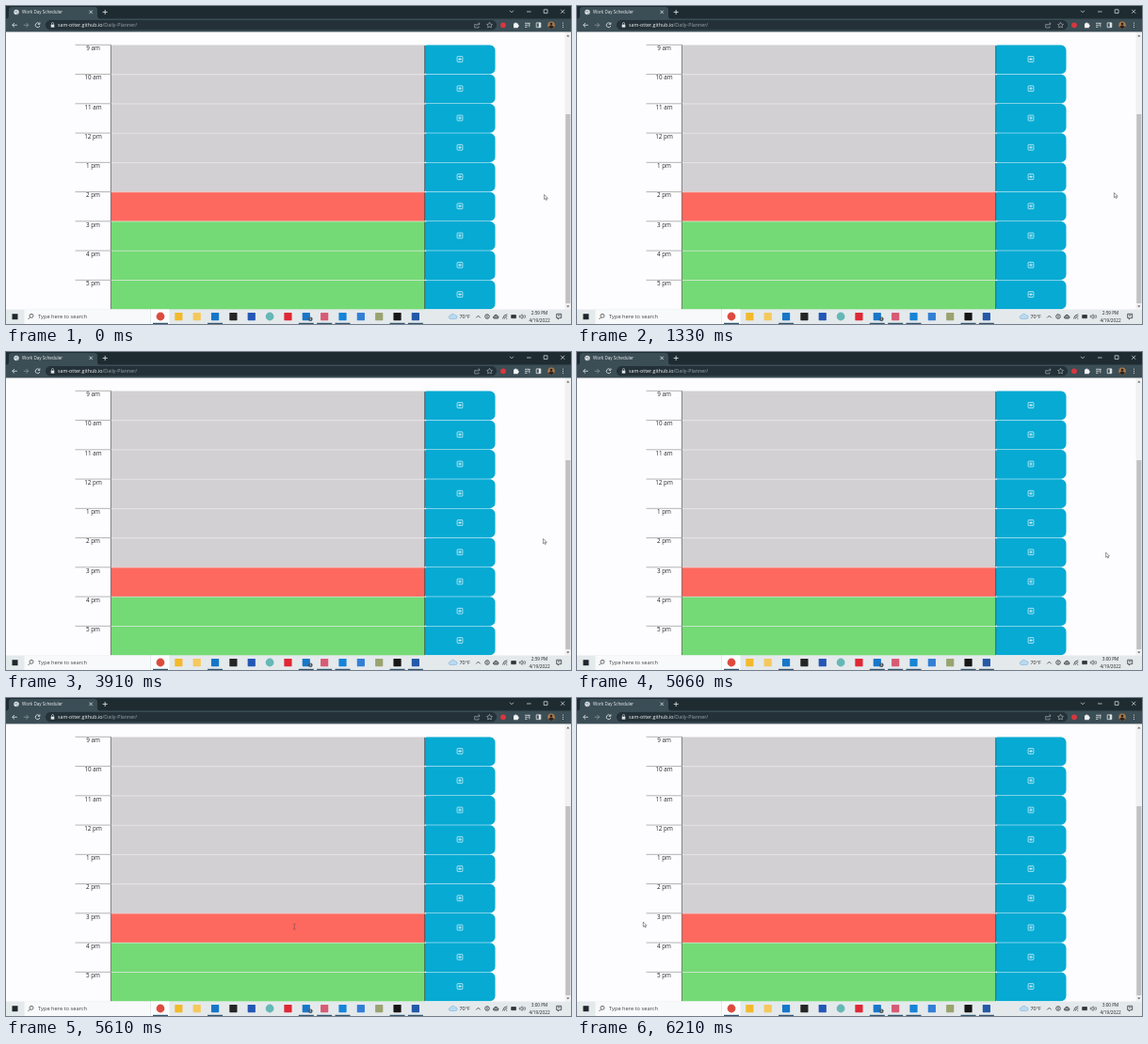
Recreate the animation shown at these times as an HTML page. Size 600 px wide and 338 px high, loop 6240 ms.

```html
<!DOCTYPE html>
<html lang="en">
<head>
<meta charset="utf-8">
<title>Work Day Scheduler</title>
<style>
html, body { margin: 0; width: 100%; height: 100%; overflow: hidden; background: #fdfcfe; }
svg { display: block; width: 100vw; height: 100vh; }
text { font-family: "Open Sans", "Noto Sans", sans-serif; }
</style>
</head>
<body>
<svg id="stage" viewBox="0 0 600 338" xmlns="http://www.w3.org/2000/svg">
  <rect width="600" height="338" fill="#fdfcfe"/>

  <g id="planner"></g>

  <g id="scrollbar">
    <rect x="593.5" y="27.500" width="6.500" height="295" fill="#f1f1f1"/>
    <rect x="594.300" y="115" width="5" height="201" fill="#c1c1c1"/>
    <path d="M595.200 32.400l1.600-1.800 1.600 1.800z" fill="#666"/>
    <path d="M595.200 318.400l1.600 1.800 1.600-1.800z" fill="#555"/>
  </g>

  <g id="browser" fill="none" stroke="#e4eaec" stroke-width=".8">
    <rect width="600" height="14" fill="#1e2c32" stroke="none"/>
    <path d="M0 13.500Q3 13.500 3 10.500V4Q3 1 6 1H94Q97 1 97 4V10.500Q97 13.500 100 13.500H600V27.500H0Z" fill="#3b4d55" stroke="none"/>
    <rect x="42" y="15" width="479" height="10.500" rx="5.250" fill="#243138" stroke="none"/>
    <circle cx="11" cy="6.500" r="2.700" fill="#dfe5e8" stroke="none"/>
    <path d="M9 5.500l2 1 1-2M11 9l1.500-2" stroke="#56676f" stroke-width=".6"/>
    <path d="M88.500 4.700l3.400 3.400m0-3.400l-3.400 3.400M102.700 6.500h5m-2.500-2.500v5"/>
    <path d="M535 4.800l2 2 2-2M553 6h4.500M571.200 3.800h3.800v3.800h-3.800zM589.200 3.800l4 4m0-4l-4 4" stroke-width=".7"/>
    <path d="M11.800 20.300H6.800M9 18L6.700 20.300 9 22.600"/>
    <path d="M18.800 20.300H23.800M21.500 18L23.800 20.300 21.500 22.600" stroke="#8d9ba2"/>
    <path d="M35.300 18.600A2.400 2.400 0 1 0 35.900 21M35.900 17.400V19.400H33.800"/>
    <rect x="47.700" y="19.700" width="3.600" height="3" fill="#dce2e5" stroke="none"/>
    <path d="M48.500 19.700V18.500a1 1 0 0 1 2 0V19.700" stroke-width=".6"/>
    <g stroke="#b4bec3" stroke-width=".6">
      <path d="M499.500 19.500H497.700V23H502V21.500M499.500 21Q500 18.800 503 18.800M501.700 17.400L503.200 18.800 501.700 20.300"/>
      <path d="M513.500 17.300l.9 1.900 2.100.3-1.500 1.400.4 2.100-1.900-1-1.900 1 .4-2.100-1.500-1.400 2.100-.3z"/>
    </g>
    <circle cx="528" cy="20.300" r="2.900" fill="#d9363e" stroke="none"/>
    <path d="M539 18.500h1.300a1 1 0 0 1 2 0h1.500v1.600a1 1 0 0 1 0 2v1.100H539z" fill="#f2f4f5" stroke="none"/>
    <path d="M551 18.300h5.500M551 20.300h3.500M551 22.300h2.500M555.800 18.300v4"/>
    <path d="M563.200 17.900h4.600v4.800h-4.600z"/>
    <path d="M565.700 17.900h2.100v4.800h-2.100z" fill="#e4eaec" stroke="none"/>
    <circle cx="579" cy="20.300" r="3.800" fill="#a5794d" stroke="none"/>
    <path d="M576 22.600Q579 18.600 582 22.600Q579 25.300 576 22.600" fill="#2c211c" stroke="none"/>
    <circle cx="579" cy="19" r="1.300" fill="#2c211c" stroke="none"/>
    <path d="M591.500 17.700v.9m0 1.300v.9m0 1.300v.9" stroke-width="1"/>
    <g stroke="none">
      <text x="17" y="8.300" font-size="4.600" fill="#edf1f2">Work Day Scheduler</text>
      <text x="55" y="22.100" font-size="5.300" fill="#f3f5f6">sam-otter.github.io<tspan fill="#9aa6ac">/Daily-Planner/</tspan></text>
    </g>
  </g>

  <g id="taskbar">
    <rect y="322.500" width="600" height="15.500" fill="#e4e9ec"/>
    <rect x="6.500" y="327.200" width="6" height="6" fill="#20272b"/>
    <rect x="19.500" y="322.500" width="133.500" height="15.500" fill="#f8f9fa"/>
    <g fill="none" stroke="#333" stroke-width=".7">
      <circle cx="27" cy="329.300" r="2"/>
      <path d="M25.500 330.900l-2 2.100"/>
    </g>
    <text x="34" y="332" font-size="5.700" fill="#454545">Type here to search</text>
    <rect x="154" y="322.500" width="19.500" height="15.500" fill="#fbfdfe"/>
    <g id="apps"></g>
    <circle cx="323.300" cy="332.800" r="2.300" fill="#40515d"/>
    <text x="323.300" y="334.200" font-size="3.600" fill="#fff" text-anchor="middle">3</text>
    <path d="M472 332.500a1.700 1.700 0 0 1 0-3.400a2.700 2.700 0 0 1 5-.4a1.900 1.900 0 0 1 .5 3.800z" fill="#b9daf0" stroke="#6fa9d4" stroke-width=".5"/>
    <text x="481.500" y="332.200" font-size="5.400" fill="#222">70°F</text>
    <g fill="none" stroke="#30363a" stroke-width=".8">
      <path d="M499.300 331.400l2.200-2.200 2.200 2.200"/>
      <circle cx="511" cy="330" r="2.300"/><path d="M511 328.500v3"/>
      <path d="M518.200 332a1.200 1.200 0 0 1 .1-2.300a2 2 0 0 1 3.800-.1a1.300 1.300 0 0 1 .2 2.400z" fill="#8a9195"/>
      <path d="M527.500 332.500Q528 328.200 532.300 327.800M529.300 332.500Q529.600 330 532.300 329.800M531.200 332.300h1"/>
      <path d="M536.700 328.500h4.700v3.200h-4.700z" fill="#30363a"/>
      <path d="M545.300 329.200h1.300l1.600-1.400v4.600l-1.600-1.400h-1.300zM549.300 328.800q1.200 1.400 0 2.700M550.700 328q1.700 2.100 0 4.200" stroke-width=".6"/>
      <path d="M584.700 327.300h5v4.300h-2.200l-1.200 1.500v-1.500h-1.600zM586 329h2.500"/>
    </g>
    <g font-size="4.700" fill="#222" text-anchor="middle">
      <text id="clock" x="566.500" y="328.200"></text>
      <text x="566.500" y="335.500">4/19/2022</text>
    </g>
  </g>

  <g id="cursor">
    <path id="arrow" d="M0 0V5.200L1.300 4.100 2.100 6 2.900 5.600 2.200 3.800H3.800Z" fill="#fff" stroke="#444" stroke-width=".55"/>
    <path id="beam" d="M-1.300-2.800H-.3L0-2.500.3-2.800H1.300M0-2.500V2.500M-1.300 2.800H-.3L0 2.500.3 2.800H1.300" fill="none" stroke="#67504d" stroke-width=".6"/>
    <path id="hand" d="M-.6 0Q0-.7.6 0V2.300L3 3V5L2.300 6.800H-.6L-2 4.200-1.300 3.600-.6 4.200Z" fill="#fff" stroke="#222" stroke-width=".5"/>
  </g>
</svg>
<script>
const LOOP = 6240;
// switched a little early so the change is in place by its display time
const HOUR_CHANGE = 3900, CLOCK_CHANGE = 4350;
const TOP = 41.3, ROW = 31.25;
const PAST = "#d2d0d2", PRESENT = "#fe695f", FUTURE = "#74da75";
const HOURS = ["9 am", "10 am", "11 am", "12 pm", "1 pm", "2 pm", "3 pm", "4 pm", "5 pm"];
const $ = id => document.getElementById(id);

function add(parent, tag, attrs, text) {
  const el = document.createElementNS("http://www.w3.org/2000/svg", tag);
  for (const k in attrs) el.setAttribute(k, attrs[k]);
  if (text) el.textContent = text;
  parent.appendChild(el);
  return el;
}

const line = (d, stroke, width = .7) =>
  add($("planner"), "path", { d, stroke, "stroke-width": width, fill: "none" });

const slots = HOURS.map((label, i) => {
  const y = TOP + i * ROW, mid = y + 15.2, p = $("planner");
  const slot = add(p, "rect", { x: 111.3, y, width: 333.7, height: ROW + .1 });
  line(`M111.300 ${y + .2}H445`, "#efedef", .6);
  line(`M73.500 ${y}H111.300`, "#969696");
  line(`M111.400 ${y}v${ROW}`, "#555");
  add(p, "text", { x: 92.5, y: y + 5.8, "font-size": 6.3, fill: "#24272a", "text-anchor": "middle" }, label);
  add(p, "path", {
    d: `M446.500 ${y + .3}H514a5.500 5.500 0 0 1 5.500 5.500v19.600a5.500 5.500 0 0 1-5.500 5.500H446.500a1.500 1.500 0 0 1-1.500-1.500V${y + 1.8}a1.500 1.500 0 0 1 1.500-1.500z`,
    fill: "#06aad3"
  });
  line(`M444.700 ${y + .7}v${ROW - 1}`, "#33474c", .8);
  add(p, "rect", { x: 479.1, y: mid - 2.9, width: 5.8, height: 5.8, rx: .5, fill: "none", stroke: "#e8f8fc", "stroke-width": .7 });
  line(`M482 ${mid - 1.7}v3.400M480.300 ${mid}h3.400`, "#e8f8fc", .8);
  return slot;
});

// colour, round shape, running
const APPS = [
  ["#dd4b3e", 1, 1], ["#f2b92b", 0, 0], ["#f5c85c", 0, 0], ["#1676c8", 0, 1],
  ["#252525", 0, 0], ["#2457b5", 0, 0], ["#65b8b5", 1, 0], ["#df2735", 0, 0],
  ["#1877c9", 0, 1], ["#d85b76", 0, 1], ["#1684d8", 0, 1], ["#327fd5", 0, 0],
  ["#9aa36f", 0, 0], ["#161616", 0, 1], ["#2459a8", 0, 1]
];
APPS.forEach(([fill, round, running], i) => {
  const x = 164 + i * 19.35, g = $("apps");
  if (round) add(g, "circle", { cx: x, cy: 330, r: 4.4, fill });
  else add(g, "rect", { x: x - 4.1, y: 326, width: 8.2, height: 8.2, rx: .6, fill });
  if (running) add(g, "rect", { x: x - 8, y: 336.8, width: 16, height: 1.2, fill: "#33566f" });
});

// time, x, y
const TRACK = [
  [0, 571.6, 200.5], [30, 570.6, 199.3], [1060, 570.6, 199.3], [1090, 570.4, 198.5],
  [4670, 570.4, 198.5], [4820, 566, 205], [5030, 566, 205], [5060, 561.7, 213],
  [5250, 543, 225], [5400, 490, 236], [5520, 405, 242], [5610, 308.3, 243],
  [5670, 185, 247], [5800, 132, 258], [5960, 102, 262], [6090, 81, 250],
  [6180, 70.3, 238], [LOOP, 70.3, 238]
];

function locate(t) {
  const i = TRACK.findIndex(k => k[0] > t);
  const a = TRACK[i - 1], b = TRACK[i], f = (t - a[0]) / (b[0] - a[0]);
  return [a[1] + (b[1] - a[1]) * f, a[2] + (b[2] - a[2]) * f];
}

function draw(ms) {
  const t = ms % LOOP;
  const now = t < HOUR_CHANGE ? 5 : 6;
  slots.forEach((s, i) => s.setAttribute("fill", i < now ? PAST : i > now ? FUTURE : PRESENT));
  $("clock").textContent = t < CLOCK_CHANGE ? "2:59 PM" : "3:00 PM";

  const [x, y] = locate(t);
  $("cursor").setAttribute("transform", `translate(${x} ${y})`);
  const kind = x > 519 || x < 111 ? "arrow" : x > 445 ? "hand" : "beam";
  for (const id of ["arrow", "beam", "hand"]) $(id).style.display = id === kind ? "" : "none";
}

const start = performance.now();
function tick() {
  draw(performance.now() - start);
  requestAnimationFrame(tick);
}
tick();
</script>
</body>
</html>
```
